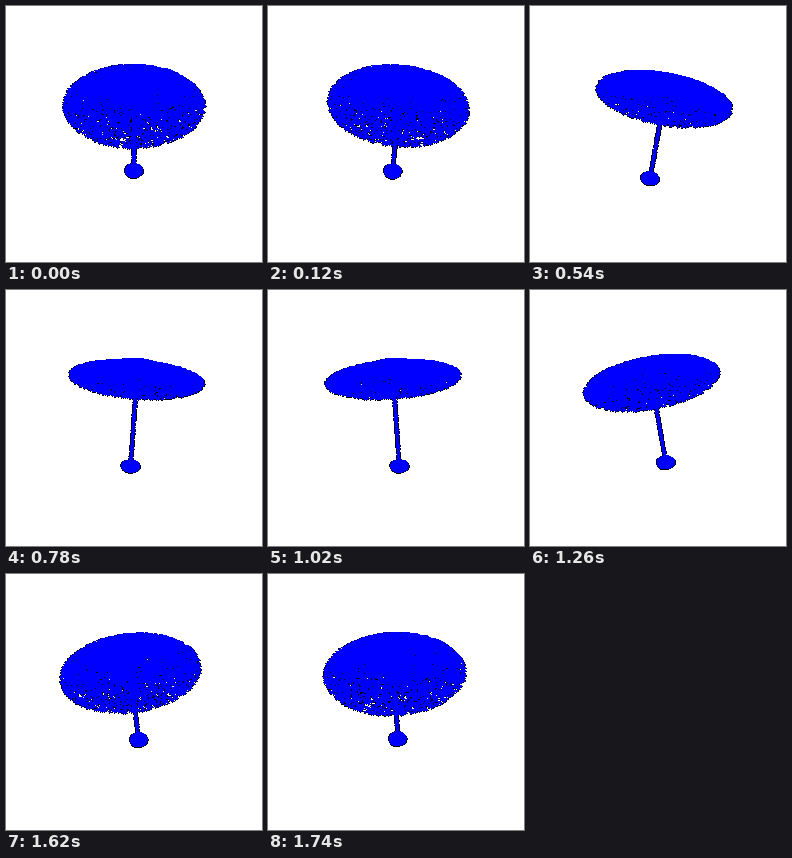
These frames come from a looping animation (256 by 256 pixels, 1.8 s). An HTML page with a canvas:

```html
<!DOCTYPE html>
<html lang="en">
<head>
<meta charset="utf-8">
<title>Turning parasol</title>
<style>
  html, body { margin: 0; width: 100%; height: 100%; overflow: hidden; background: #fff; }
  canvas { display: block; width: 256px; height: 256px; }
</style>
</head>
<body>
<canvas id="stage" width="256" height="256"></canvas>
<script>
const SIZE = 256, STEP = 60, STEPS = 30;
const FOCAL = SIZE / 2 / Math.tan(Math.PI / 6);
const TILT = 9 * Math.PI / 180, ELEVATION = 35.1 * Math.PI / 180;
const WHITE = 0xffffffff, BLUE = 0xffff0000, BLACK = 0xff000000;

const ctx = document.getElementById('stage').getContext('2d');
const image = ctx.createImageData(SIZE, SIZE);
const pixels = new Uint32Array(image.data.buffer);

let seed = 7;
function random() {
  seed = (Math.imul(seed, 1664525) + 1013904223) >>> 0;
  return seed / 4294967296;
}

// Points of the parasol, leaned over once; only the turn changes later.
const points = [];
function addRing(radius, height) {
  const angle = random() * 2 * Math.PI;
  const side = radius * Math.cos(angle), front = radius * Math.sin(angle);
  points.push([
    side,
    front * Math.cos(TILT) + height * Math.sin(TILT),
    height * Math.cos(TILT) - front * Math.sin(TILT)
  ]);
}
function repeat(count, make) {
  for (let i = 0; i < count; i++) make();
}

// Canopy: a shallow bell
repeat(14000, () => {
  const t = random();
  addRing(59.2 * t, 44.5 + 6.3 * (1 + Math.cos(Math.PI * t)));
});
// Pole
repeat(500, () => addRing(0.8, -60 + 112 * random()));
// Foot: a flattened ball
repeat(500, () => {
  const t = 2 * random() - 1;
  addRing(9.4 * Math.sqrt(1 - t * t), -60.5 + 2.5 * t);
});

function plot(x, y, color) {
  if (x >= 0 && y >= 0 && x < SIZE && y < SIZE) pixels[y * SIZE + x] = color;
}

function render(turn) {
  const ct = Math.cos(turn), st = Math.sin(turn);
  const ce = Math.cos(ELEVATION), se = Math.sin(ELEVATION);
  const dots = points.map(([x, y, z]) => {
    const right = x * ct + y * st, front = y * ct - x * st;
    const scale = FOCAL / (FOCAL - front * ce - z * se);
    return [
      Math.round(SIZE / 2 + right * scale - 1),
      Math.round(SIZE / 2 - (z * ce - front * se) * scale - 1)
    ];
  });

  pixels.fill(WHITE);
  // Dark dot edges stay visible only at the rim and in gaps
  for (const [x, y] of dots) {
    plot(x + 2, y + 1, BLACK);
    plot(x - 1, y, BLACK);
    plot(x, y + 2, BLACK);
  }
  for (const [x, y] of dots) {
    plot(x, y, BLUE);
    plot(x + 1, y, BLUE);
    plot(x, y + 1, BLUE);
    plot(x + 1, y + 1, BLUE);
  }
  ctx.putImageData(image, 0, 0);
}

const start = performance.now();
let shown = -1;
function tick() {
  const step = Math.floor((performance.now() - start) / STEP) % STEPS;
  if (step !== shown) {
    shown = step;
    render(step / STEPS * 2 * Math.PI);
  }
  requestAnimationFrame(tick);
}
tick();
</script>
</body>
</html>
```
